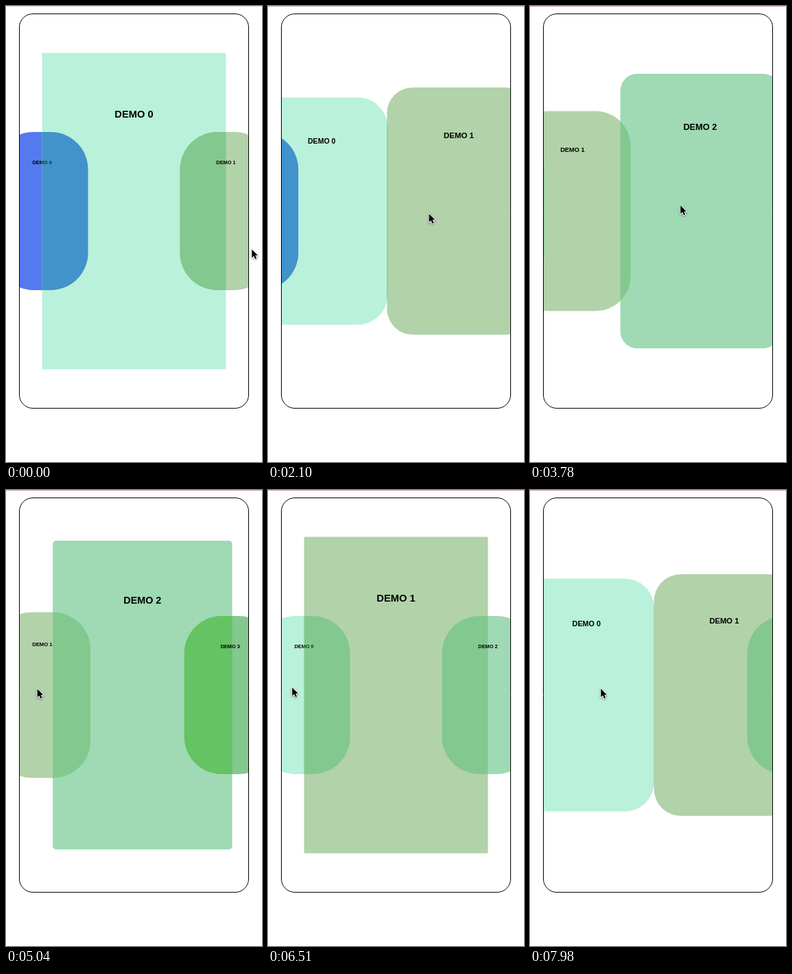
Write an HTML page with a canvas that moves like this. It is 373 px wide and 666 px high and loops after 8 s.

```html
<!DOCTYPE html>
<html lang="en">
<head>
<meta charset="utf-8">
<title>Card carousel</title>
<style>
  html, body { margin: 0; width: 373px; height: 666px; overflow: hidden; background: #fff; }
  canvas { display: block; }
</style>
</head>
<body>
<canvas id="stage" width="373" height="666"></canvas>
<script>
const ctx = document.getElementById('stage').getContext('2d');
const LOOP = 8000, STEP = 70;
const CX = 186.5, CY = 299.5, CARD_W = 267.8, CARD_H = 462, CORNER = 109;

// Ordered back to front; "over" is the colour where a card covers the one before it.
const cards = [
  { at: -1, label: 'DEMO 4', fill: '#547aee' },
  { at: 0, label: 'DEMO 0', fill: '#b9f1da', over: '#4292cc', dim: '#073e28' },
  { at: 1, label: 'DEMO 1', fill: '#b2d2aa', over: '#83c88f', dim: '#0a3c14' },
  { at: 2, label: 'DEMO 2', fill: '#9fdab4', over: '#83c88f', dim: '#0a3c14' },
  { at: 3, label: 'DEMO 3', fill: '#83c88f', over: '#66c364', dim: '#0a3c14' }
];

// Start and end of each swipe: [time, page]
const swipes = [
  [1560, 0], [2560, 1], [3281, 1], [4041, 2], [4934, 2],
  [5694, 1], [6519, 1], [7279, 0], [7586, 0], [8346, 1]
];

// Turning points of the pointer tip: [time, x, y]
const pointer = [
  [450, 357.5, 354.5], [910, 329, 307], [1560, 329, 306], [2560, 160, 300],
  [3050, 329, 289], [3281, 329, 289], [4041, 179, 291], [4690, 34.5, 289],
  [4920, 34.5, 289], [5640, 190, 298], [6370, 34.5, 287.5], [6500, 34.5, 287.5],
  [7280, 214, 304], [7560, 214, 304], [8300, 30, 280]
];

// Selected card, from a given time on; only it and its neighbours exist.
const selected = [[0, 0], [2700, 1], [4200, 2], [5800, 1]];

const ease = u => (1 - Math.cos(Math.PI * u)) / 2;

function sample(keys, t) {
  const i = keys.findIndex(k => k[0] > t);
  const [t0, ...from] = keys[Math.max(0, i - 1)];
  const [t1, ...to] = keys[i];
  const u = i ? ease((t - t0) / (t1 - t0)) : 0;
  return from.map((v, n) => v + (to[n] - v) * u);
}

function roundRect(x, y, w, h, r) {
  const path = new Path2D();
  path.roundRect(x, y, w, h, r);
  return path;
}

const frame = roundRect(19.5, 11.5, 334, 576, 19.5);
const arrow = new Path2D('M0 0V13.6L3.2 10.7L5.4 15.7L7.7 14.7L5.6 9.8H9.8Z');

function place(card, page) {
  const d = card.at - page, near = Math.min(1, Math.abs(d));
  const scale = 1 - near / 2;
  const w = CARD_W * scale, h = CARD_H * scale;
  const x = CX + CARD_W * d * scale;
  const path = roundRect(x - w / 2, CY - h / 2, w, h, CORNER * near * scale);
  return { ...card, x, scale, path };
}

function drawLabel(c, color) {
  ctx.save();
  ctx.translate(c.x, CY - 142 * c.scale);
  ctx.scale(c.scale, c.scale);
  ctx.font = 'bold 14.7px "Liberation Sans", Arial, sans-serif';
  ctx.textAlign = 'center';
  ctx.fillStyle = color;
  ctx.fillText(c.label, 0, 5.3);
  ctx.restore();
}

function drawCard(c, below) {
  ctx.fillStyle = c.fill;
  ctx.fill(c.path);
  if (below) {
    ctx.save();
    ctx.clip(c.path);
    ctx.fillStyle = c.over;
    ctx.fill(below.path);
    drawLabel(below, c.dim);
    ctx.restore();
  }
  drawLabel(c, '#000');
}

function drawPointer([x, y]) {
  ctx.save();
  ctx.translate(x + .7, y + .9);
  ctx.scale(.9, .9);
  ctx.lineJoin = 'round';
  ctx.shadowColor = 'rgba(0,0,0,.4)';
  ctx.shadowBlur = 3;
  ctx.shadowOffsetY = 1;
  ctx.strokeStyle = '#fff';
  ctx.lineWidth = 2;
  ctx.stroke(arrow);
  ctx.shadowColor = 'transparent';
  ctx.fillStyle = '#000';
  ctx.fill(arrow);
  ctx.restore();
}

function draw(t) {
  const [page] = sample(swipes, t);
  const [, home] = selected.findLast(s => s[0] <= t);

  ctx.fillStyle = '#fff';
  ctx.fillRect(0, 0, 373, 666);
  ctx.fillStyle = t < 1050 ? '#d6d6d6' : t < 2450 ? '#bcbcbc' : '#c8a6a6';
  ctx.fillRect(0, 0, 373, 1);

  ctx.save();
  ctx.clip(frame);
  cards.filter(c => Math.abs(c.at - home) <= 1)
    .map(c => place(c, page))
    .forEach((c, i, all) => drawCard(c, all[i - 1]));
  ctx.restore();

  ctx.strokeStyle = '#000';
  ctx.lineWidth = 1;
  ctx.stroke(frame);
  drawPointer(sample(pointer, t));
}

const start = performance.now();
function tick() {
  const t = Math.max(0, performance.now() - start) % LOOP;
  draw(Math.floor(t / STEP) * STEP);
  requestAnimationFrame(tick);
}
tick();
</script>
</body>
</html>
```
